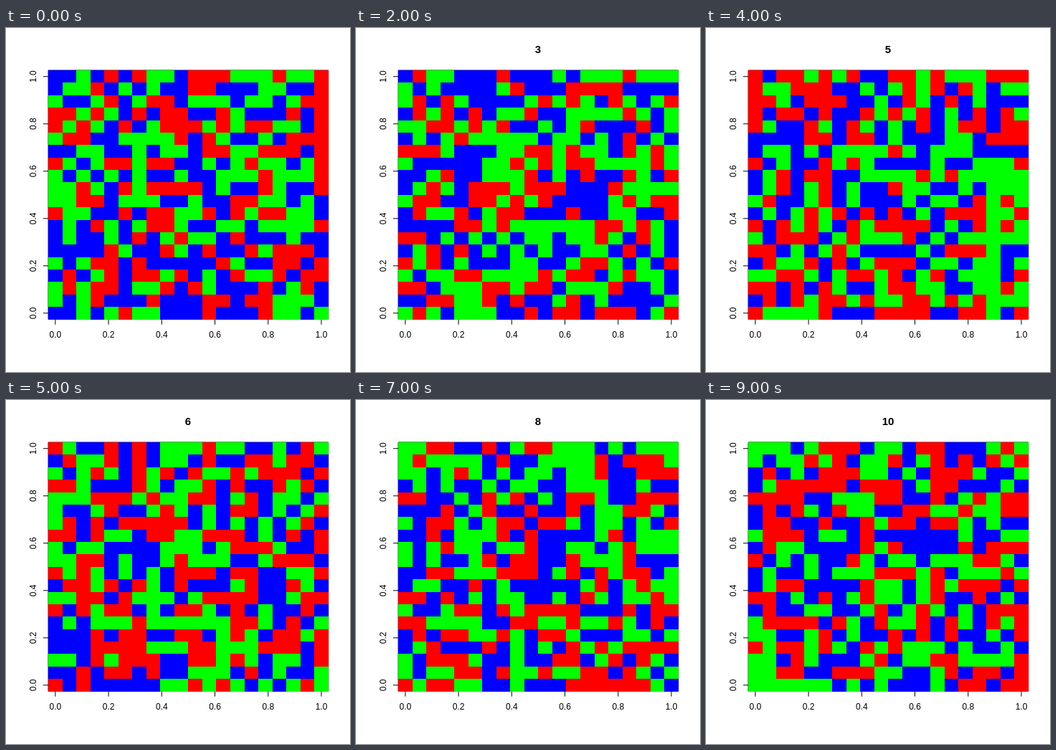
An HTML page with a canvas that plays this animation: 480 px wide and 480 px high, repeating every 10 s.

```html
<!DOCTYPE html>
<html lang="en">
<head>
<meta charset="utf-8">
<title>Random three-colour grid</title>
<style>
  html, body { margin: 0; width: 100%; height: 100%; overflow: hidden; background: #fff; }
  canvas, svg { position: absolute; left: 0; top: 0; width: 480px; height: 480px; }
  text { font: 12px "Liberation Sans", Arial, sans-serif; text-anchor: middle; }
  #title { font-size: 15px; font-weight: bold; }
  path { fill: none; stroke: #000; stroke-width: 1; }
</style>
</head>
<body>
<!-- The cells cover the inner part of the frame line. -->
<svg id="axes" viewBox="0 0 480 480">
  <text id="title" x="254" y="35"></text>
</svg>
<canvas id="grid" width="480" height="480"></canvas>
<script>
const SIZE = 20, STEPS = 10, STEP_MS = 1000;
const COLORS = ['#f00', '#0f0', '#00f'];
const plot = { left: 59.04, top: 59.04, right: 449.76, bottom: 406.56 };
const cellW = (plot.right - plot.left) / SIZE;
const cellH = (plot.bottom - plot.top) / SIZE;
const ctx = document.getElementById('grid').getContext('2d');
const svg = document.getElementById('axes');
const title = document.getElementById('title');

function add(tag, attributes, content = '') {
  const node = document.createElementNS(svg.namespaceURI, tag);
  for (const name in attributes) node.setAttribute(name, attributes[name]);
  node.textContent = content;
  svg.append(node);
}

function drawAxes() {
  const { left, top, right, bottom } = plot;
  const x = v => left + cellW / 2 + v * (right - left - cellW);
  const y = v => bottom - cellH / 2 - v * (bottom - top - cellH);
  add('path', { d: `M${left} ${top}H${right}V${bottom}H${left}Z` });
  for (let i = 0; i <= 5; i++) {
    const v = i / 5, label = v.toFixed(1);
    add('path', { d: `M${x(v)} ${bottom}v7.2M${left} ${y(v)}h-7.2` });
    add('text', { x: x(v), y: 432 }, label);
    add('text', { transform: `translate(42 ${y(v)}) rotate(-90)` }, label);
  }
}

function seededRandom(seed) {
  return () => {
    seed = (seed + 0x6D2B79F5) | 0;
    let t = Math.imul(seed ^ (seed >>> 15), 1 | seed);
    t = (t + Math.imul(t ^ (t >>> 7), 61 | t)) ^ t;
    return ((t ^ (t >>> 14)) >>> 0) / 4294967296;
  };
}

function drawStep(step) {
  const random = seededRandom(7919 * (step + 1));
  const edgeX = i => Math.round(plot.left + i * cellW);
  const edgeY = j => Math.round(plot.top + j * cellH);
  for (let j = 0; j < SIZE; j++) {
    for (let i = 0; i < SIZE; i++) {
      ctx.fillStyle = COLORS[Math.floor(random() * COLORS.length)];
      ctx.fillRect(edgeX(i), edgeY(j), edgeX(i + 1) - edgeX(i), edgeY(j + 1) - edgeY(j));
    }
  }
  // The first step has no heading.
  title.textContent = step ? step + 1 : '';
}

let shown = -1;
function tick() {
  const step = Math.floor(performance.now() / STEP_MS) % STEPS;
  if (step !== shown) drawStep(shown = step);
  requestAnimationFrame(tick);
}

drawAxes();
tick();
</script>
</body>
</html>
```
